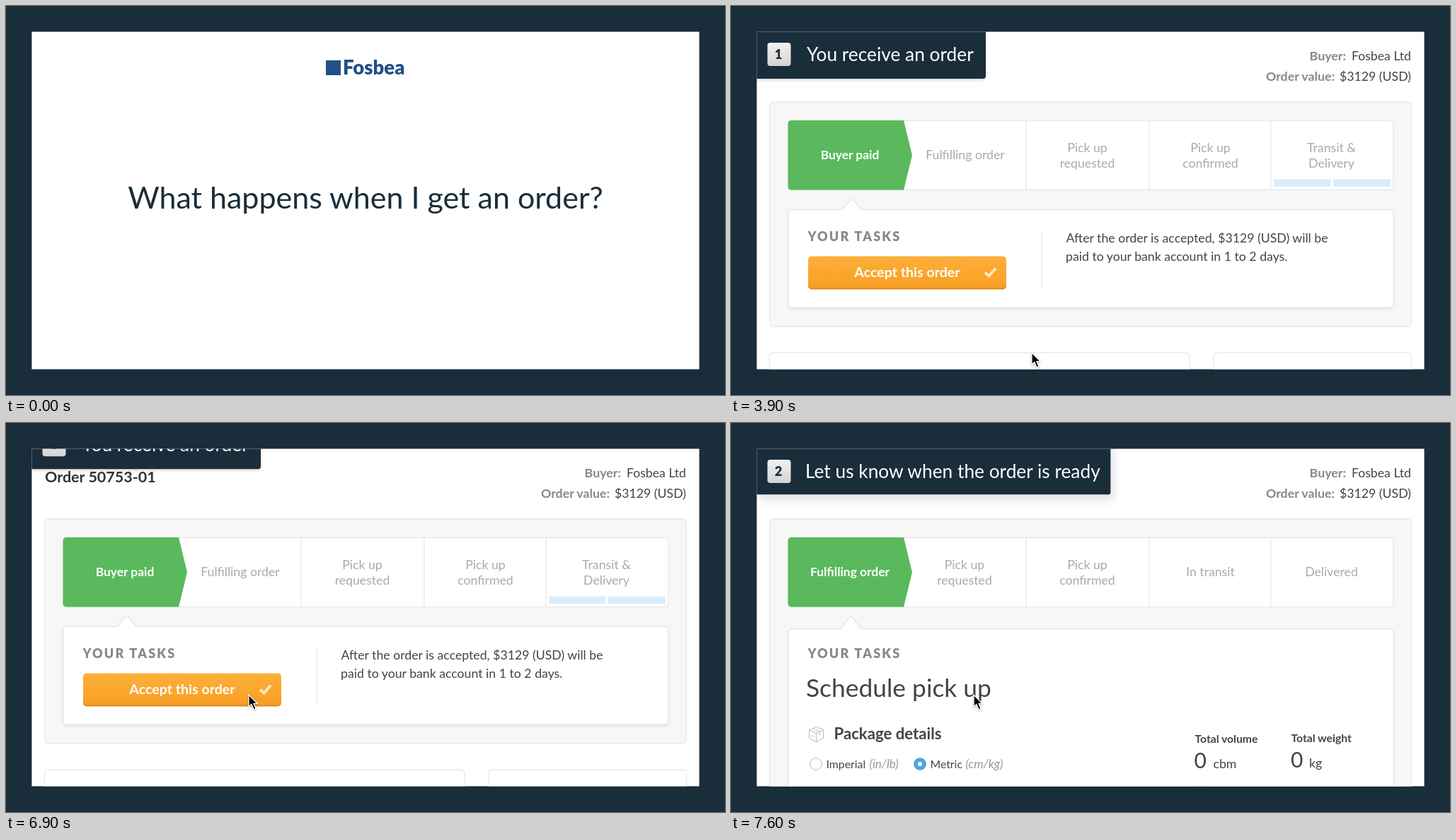
Recreate the animation shown at these times as an HTML page. Size 1016x551 px, loop 8000 ms.

```html
<!DOCTYPE html>
<html lang="en">
<head>
<meta charset="utf-8">
<title>What happens when I get an order?</title>
<style>
html, body { margin: 0; width: 100%; height: 100%; overflow: hidden; background: #1a2d3a; }
svg { display: block; width: 100%; height: 100%; }
text { font: 400 17.7px Lato, sans-serif; fill: #444; white-space: pre; }
.bold { font-weight: 700; font-size: 17.4px; }
.mid { text-anchor: middle; }
.end { text-anchor: end; }
.grey { fill: #aaa; }
.label { fill: #888; font-size: 17.8px; }
.white { fill: #fff; }
.head { font-size: 26.3px; fill: #fff; }
.badge { font-weight: 900; font-size: 18px; fill: #1a2d3a; text-anchor: middle; }
.tasks { font-weight: 900; font-size: 18px; letter-spacing: 2.2px; fill: #888; }
.small { font-size: 15.8px; }
.unit { font-size: 17px; font-style: italic; fill: #999; }
.total { font-size: 15.7px; }
.count { font-size: 30px; }
.line { stroke: #e9e9e9; stroke-width: 1.3; }
.card { fill: #fff; filter: drop-shadow(0 2px 2px rgba(0,0,0,.08)); }
</style>
</head>
<body>
<svg viewBox="0 0 1016 551">
  <defs>
    <clipPath id="stage"><path d="M36.4 36.4h943.2v478.2H36.4z"/></clipPath>
    <clipPath id="window"><path d="M68 270h348v170H68z"/></clipPath>
    <linearGradient id="orange" x2="0" y2="1"><stop stop-color="#fdb03a"/><stop offset="1" stop-color="#f89f24"/></linearGradient>
    <linearGradient id="hover" x2="0" y2="1"><stop stop-color="#ffc653"/><stop offset="1" stop-color="#ffaf3c"/></linearGradient>
    <linearGradient id="key" x2="0" y2="1"><stop stop-color="#f2f2f2"/><stop offset="1" stop-color="#d3d3d3"/></linearGradient>
    <g id="bar">
      <rect x="81" y="162.5" width="855" height="98" rx="5" fill="#fff" class="line"/>
      <path d="M417 163v97M591 163v97M763 163v97" class="line"/>
      <path d="M85.5 162H244L256 211.5 244 260.6H85.5q-5 0-5-5V167q0-5 5-5z" fill="#59b95c"/>
    </g>
  </defs>
  <rect width="1016" height="551" fill="#1a2d3a"/>
  <g clip-path="url(#stage)">
    <path d="M36 36h944v479H36z" fill="#fff"/>
    <g id="intro">
      <rect x="452" y="77" width="21" height="21" fill="#224f87"/>
      <text x="476" y="97" style="font-weight:900;font-size:27.5px;fill:#224f87">Fosbea</text>
      <text x="508" y="287" class="mid" style="font-size:43px;fill:#1a2d3a">What happens when I get an order?</text>
    </g>

    <g id="view"><g id="page">
      <text x="55" y="84" class="bold" style="font-size:21.5px;fill:#333">Order 50753-01</text>
      <text x="869" y="77" class="bold label end">Buyer:</text>
      <text x="961" y="77" class="end">Fosbea Ltd</text>
      <text x="853" y="106" class="bold label end">Order value:</text>
      <text x="961" y="106" class="end">$3129 (USD)</text>
      <g class="line">
        <rect x="54.5" y="136" width="907" height="318" rx="6" fill="#f7f7f7"/>
        <rect x="54.5" y="491" width="593.5" height="60" rx="6" fill="#fff"/>
        <rect x="682" y="491" width="279.5" height="60" rx="6" fill="#fff"/>
      </g>
      <g id="content">
        <use href="#bar"/>
        <path d="M767 245.5h80v10.5h-80zM851 245.5h81v10.5h-81z" fill="#d8edfc"/>
        <text x="168" y="217" class="bold white mid">Buyer paid</text>
        <g class="mid">
          <text x="331" y="217" class="grey">Fulfilling order</text>
          <text x="503.5" y="207" class="grey">Pick up</text>
          <text x="503.5" y="229" class="grey">requested</text>
          <text x="677.5" y="207" class="grey">Pick up</text>
          <text x="677.5" y="229" class="grey">confirmed</text>
          <text x="848.5" y="207" class="grey">Transit &amp;</text>
          <text x="848.5" y="229" class="grey">Delivery</text>
        </g>
        <path class="card line" d="M86 288.5H157L170.5 273 184 288.5H931q5 0 5 5V422q0 5-5 5H86q-5 0-5-5V293.5q0-5 5-5z"/>
        <path d="M439 319v80" class="line"/>
        <text x="108.5" y="333" class="tasks">YOUR TASKS</text>
        <rect x="109" y="356" width="280" height="45.5" rx="5" fill="#e08f1c"/>
        <rect id="button" x="109" y="354.5" width="280" height="44.5" rx="5"/>
        <text x="249" y="384" class="bold white mid" style="font-size:19.6px">Accept this order</text>
        <path d="M359 377.5l5.5 5 9.5-11" fill="none" stroke="#ffe6bd" stroke-width="4"/>
        <text x="473.5" y="335">After the order is accepted, $3129 (USD) will be</text>
        <text x="473" y="361">paid to your bank account in 1 to 2 days.</text>
      </g>
    </g></g>

    <g id="focus">
      <rect x="61" y="263.5" width="362" height="183" rx="7" fill="none" stroke="#4fb0e2" stroke-width="1.5"/>
      <use href="#page" clip-path="url(#window)"/>
    </g>

    <g id="next">
      <rect x="54.5" y="136" width="907" height="400" rx="6" fill="#f7f7f7" class="line"/>
      <use href="#bar"/>
      <text x="168" y="217" class="bold white mid">Fulfilling order</text>
      <g class="mid">
        <text x="330" y="207" class="grey">Pick up</text>
        <text x="330" y="229" class="grey">requested</text>
        <text x="503.5" y="207" class="grey">Pick up</text>
        <text x="503.5" y="229" class="grey">confirmed</text>
        <text x="677.5" y="217" class="grey">In transit</text>
        <text x="848.5" y="217" class="grey">Delivered</text>
      </g>
      <path class="card line" d="M86 292H155L169 273 184 292H931q5 0 5 5V540H81V297q0-5 5-5z"/>
      <text x="108.5" y="333" class="tasks">YOUR TASKS</text>
      <text x="106" y="388" style="font-size:35.4px">Schedule pick up</text>
      <path d="M120.5 430.5l10 4v12l-10 5-10-5v-12zM110.5 434.5l10 5 10-5M120.5 439.5v12M115.5 432.5l10 5v4.5M113 442.5l4 2" fill="none" stroke="#bbb"/>
      <text x="145.5" y="448" class="bold" style="font-size:22.2px">Package details</text>
      <circle cx="120" cy="483" r="8.3" fill="#fff" stroke="#ccc" stroke-width="1.3"/>
      <text x="134.5" y="489" class="small">Imperial</text>
      <text x="195.5" y="489" class="unit">(in/lb)</text>
      <circle cx="267" cy="483" r="9" fill="#4fa5e2"/>
      <circle cx="267" cy="483" r="3" fill="#fff"/>
      <text x="281.5" y="489" class="small">Metric</text>
      <text x="331.5" y="489" class="unit">(cm/kg)</text>
      <text x="655.5" y="452.5" class="bold total">Total volume</text>
      <text x="654.5" y="489" class="count">0</text>
      <text x="681.5" y="489">cbm</text>
      <text x="791.5" y="451.5" class="bold total">Total weight</text>
      <text x="791" y="488" class="count">0</text>
      <text x="817" y="487.5">kg</text>
    </g>

    <g id="tag1">
      <path d="M36 0H360V99q0 4-4 4H36z" fill="#1a2d3a" style="filter:drop-shadow(0 2px 2px rgba(0,0,0,.15))"/>
      <rect x="51.5" y="52" width="33" height="33" rx="4" fill="url(#key)"/>
      <text x="67" y="75" class="badge">1</text>
      <text x="107" y="78" class="head">You receive an order</text>
    </g>
    <g id="tag2">
      <path d="M36 0H536.3V98.3q0 3-3 3H36z" fill="#1a2d3a" style="filter:drop-shadow(5px 8px 6px rgba(40,10,40,.12))"/>
      <rect x="51.5" y="52" width="33" height="33" rx="4" fill="url(#key)"/>
      <text x="67" y="75" class="badge">2</text>
      <text x="105" y="78" class="head">Let us know when the order is ready</text>
    </g>

    <g id="arrow" style="filter:drop-shadow(0 1px 1px rgba(0,0,0,.35))">
      <path d="M0 0v17l3.8-3.6 3.3 7.5 3.1-1.3-3.3-7.3h5.2z" stroke="#fff" stroke-width="1.3"/>
    </g>
    <g id="hand" transform="translate(337 381)" fill="#fff" stroke="#000" stroke-width="1.3" style="filter:drop-shadow(0 1px 1px rgba(0,0,0,.3))">
      <path d="M5 12V2.6a1.9 1.9 0 0 1 3.8 0V8q3-1 3.4.8 2.6-.9 3.2.9 2.6-.4 2.6 2V15q0 2-1.6 4.2V21H7.4q0-1.7-2-3.7L1.2 12.2q-1-1.6.4-2.2 1.3-.5 3.4 2z"/>
      <path d="M9 13v4M11.8 13v4M14.6 13v4" stroke-width="1"/>
    </g>
  </g>
</svg>
<script>
const LOOP = 8000, STEP = 100;
const $ = id => document.getElementById(id);

// Linear interpolation through [time, value] pairs
function track(t, ...keys) {
  if (t <= keys[0][0]) return keys[0][1];
  for (let i = 1; i < keys.length; i++) {
    const [t0, v0] = keys[i - 1], [t1, v1] = keys[i];
    if (t <= t1) return v0 + (v1 - v0) * (t - t0) / (t1 - t0);
  }
  return keys[keys.length - 1][1];
}
const easeOut = p => 1 - (1 - p) ** 2;
const smooth = p => p * p * (3 - 2 * p);
const show = (id, on) => $(id).style.display = on ? '' : 'none';
const fade = (id, v) => { $(id).style.opacity = v; show(id, v > 0); };
const move = (id, x, y) => $(id).setAttribute('transform', `translate(${x} ${y})`);

function dropTag(id, p) {
  show(id, p > 0);
  move(id, 0, -85 * (1 - easeOut(p)));
}

function draw(t) {
  const enter = track(t, [400, 0], [900, 1]);
  fade('intro', 1 - enter);
  move('intro', 0, -34 * enter * enter);

  const blur = track(t, [4300, 0], [4600, 1], [6500, 1], [6600, .4], [6700, 0]);
  fade('view', enter * (1 - .75 * blur ** 3));
  $('view').style.filter = blur ? `blur(${2.2 * blur}px)` : 'none';
  fade('focus', Math.min(1, blur * 1.5));

  fade('content', track(t, [6900, 1], [7000, .7], [7100, .37], [7200, 0]));
  fade('next', track(t, [7200, 0], [7600, 1]));
  dropTag('tag1', track(t, [1000, 0], [1400, 1], [6700, 1], [7000, 0]));
  dropTag('tag2', track(t, [7400, 0], [7600, 1]));

  const over = t >= 4300 && t < 6800;
  const go = smooth(track(t, [3900, 0], [4300, 1]));
  $('button').setAttribute('fill', over ? 'url(#hover)' : 'url(#orange)');
  show('hand', over);
  show('arrow', t >= 3900 && !over);
  move('arrow', 425 - 82 * go, 491 - 106 * go);
}

const start = performance.now();
function tick() {
  const t = (performance.now() - start) % LOOP;
  draw(Math.floor(t / STEP) * STEP);
  requestAnimationFrame(tick);
}
tick();
</script>
</body>
</html>
```
